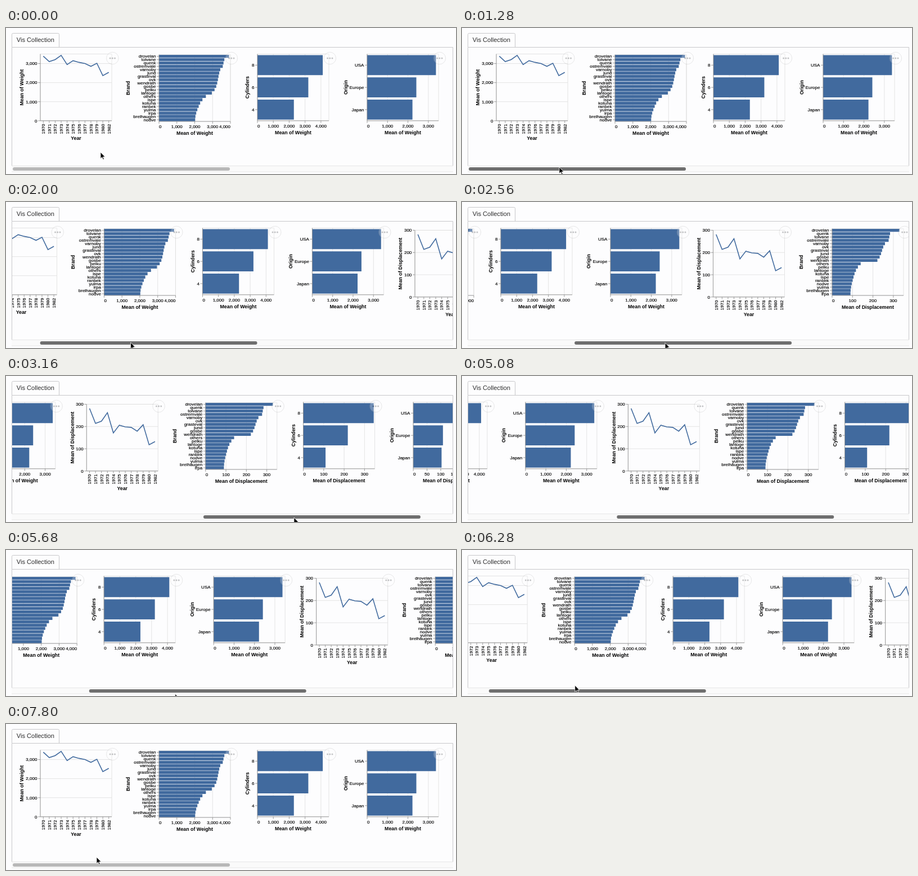
These frames come from a looping animation (800 px wide and 261 px high, 7.88 s). An HTML page:

```html
<!DOCTYPE html>
<html lang="en">
<head>
<meta charset="utf-8">
<title>Vis Collection</title>
<style>
html, body { margin: 0; width: 100%; height: 100%; overflow: hidden; background: #fdfdfe; }
svg { display: block; width: 800px; height: 261px; }
text { font: 8px "Liberation Sans", Arial, sans-serif; stroke: #000; stroke-width: .15; }
.title { font-size: 8.8px; font-weight: bold; text-anchor: middle; stroke: none; }
.tab { font-size: 11.1px; fill: #2a2a2a; stroke: none; }
.mid { text-anchor: middle; }
.end { text-anchor: end; }
.grid { fill: none; stroke: #ddd; stroke-width: .8; }
.axis { fill: none; stroke: #888; stroke-width: .8; }
.mark { fill: #416a9e; }
.line { fill: none; stroke: #416a9e; stroke-width: 1.6; }
.frame { fill: none; stroke: #c8c8ca; }
.menu { opacity: .25; }
</style>
</head>
<body>
<svg viewBox="0 0 800 261">
  <clipPath id="view"><rect x="10" y="35" width="785" height="211"/></clipPath>
  <path class="frame" d="M10.5 34V11.5q0-2 2-2H92.5q2 0 2 2V34"/>
  <text class="tab" x="18.8" y="25">Vis Collection</text>
  <g clip-path="url(#view)"><g id="charts"></g></g>
  <rect x="10" y="246" width="785" height="11" fill="#fafafa"/>
  <path d="M10 246.5H795M10 257H795" stroke="#e6e6e6"/>
  <path class="frame" d="M10.5 246V34.5H794.5V246"/>
  <rect id="thumb" y="249" width="386" height="6" rx="3"/>
  <path id="cursor" d="M0 0V11.5L2.7 9L4.6 13.3L6.4 12.5L4.5 8.4H8.1Z" stroke="#fff" stroke-width=".8"/>
</svg>
<script>
const $ = id => document.getElementById(id);
const W = 127, H = 119.3, LOOP = 7880;

// Monotone cubic curve through [position, value] keys, held flat beyond both ends.
function curve(...keys) {
  const rise = keys.slice(1).map(([t, v], i) => (v - keys[i][1]) / (t - keys[i][0]));
  const slope = keys.map((_, i) => {
    const a = rise[i - 1], b = rise[i];
    return a * b > 0 ? 2 * a * b / (a + b) : 0;
  });
  return t => {
    const i = keys.findIndex(k => k[0] > t);
    if (i === 0) return keys[0][1];
    if (i < 0) return keys[keys.length - 1][1];
    const [t0, v0] = keys[i - 1], [t1, v1] = keys[i], d = t1 - t0, u = (t - t0) / d, w = 1 - u;
    return v0 * (1 + 2 * u) * w * w + v1 * u * u * (3 - 2 * u)
      + d * u * w * (slope[i - 1] * w - slope[i] * u);
  };
}

const path = (cls, d) => `<path class="${cls}" d="${d}"/>`;
const text = (cls, x, y, s, turn) => turn
  ? `<text class="${cls}" transform="translate(${x} ${y}) rotate(-90)">${s}</text>`
  : `<text class="${cls}" x="${x}" y="${y}">${s}</text>`;
const range = n => [...Array(n).keys()];
const ticks = (max, step) => range(Math.floor(max / step) + 1).map(i => i * step);
const num = v => v.toLocaleString('en-US');

function menu(x) {
  const dots = [-4.2, 0, 4.2].map(d => `<circle cx="${x + d}" cy="54" r="1.5" fill="#1b1e23"/>`).join('');
  return `<g class="menu"><circle cx="${x}" cy="54" r="10.8" fill="#fff" stroke="#999" stroke-width=".9"/>${dots}</g>`;
}

function lineChart({ x, top, title, gap, max, step, values }) {
  const base = top + H, px = i => x + (i + .5) * W / values.length, py = v => base - v / max * H;
  let s = path('grid', `M${x} ${top}h${W}v${H}h${-W}z`);
  for (const v of ticks(max, step)) {
    s += path('grid', `M${x} ${py(v)}h${W}`) + path('axis', `M${x} ${py(v)}h-4`)
      + text('end', x - 5.6, py(v) + 2.8, num(v));
  }
  s += path('line', 'M' + values.map((v, i) => `${px(i)} ${py(v)}`).join('L'));
  s += path('axis', `M${x} ${top}v${H}h${W}`);
  values.forEach((_, i) => {
    const year = i < 11 ? 1970 + i : 1982; // 1981 has no data
    s += path('axis', `M${px(i)} ${base}v4`) + text('end', px(i) + 2.9, base + 5.8, year, true);
  });
  return s + text('title', x + W / 2, base + 33.7, 'Year')
    + text('title', x - gap + 3, top + H / 2, title, true) + menu(x + 128.3);
}

function barChart({ x, top = 46.5, field, title, gap, max, step, names, value }) {
  const base = top + H, band = H / names.length, px = v => x + v / max * W;
  let s = path('grid', `M${x} ${top}h${W}v${H}h${-W}z`);
  for (const v of ticks(max, step)) {
    const cls = v === 0 ? '' : v === max ? 'end' : 'mid';
    s += path('grid', `M${px(v)} ${top}v${H}`) + path('axis', `M${px(v)} ${base}v4`)
      + text(cls, px(v), base + 12.4, num(v));
  }
  names.forEach((name, i) => {
    const y = top + (i + .5) * band;
    s += path('mark', `M${x} ${y - band * .45}H${px(value(i))}v${band * .9}H${x}z`)
      + path('axis', `M${x} ${y}h-4`) + text('end', x - 5.6, y + 2.8, name);
  });
  return s + path('axis', `M${x} ${top}v${H}h${W}`)
    + text('title', x + W / 2, base + 24.4, title)
    + text('title', x - gap + 3, top + H / 2, field, true) + menu(x + 128.8);
}

const yearly = [281, 214, 224, 262, 171, 206, 198, 196, 179, 208, 118, 132];
const toWeight = (d, i) => 3050 + 1174 * Math.log(d / 200) + 80 * Math.sin((i - 1.5) * Math.PI / 5);

const weight = { title: 'Mean of Weight', step: 1000 };
const displacement = { title: 'Mean of Displacement', step: 100, max: 350 };
const brand = { field: 'Brand', gap: 55, top: 47.7 };
const cylinders = { field: 'Cylinders', gap: 17.7, names: [8, 6, 4] };
const origin = { field: 'Origin', gap: 38.5, names: ['USA', 'Europe', 'Japan'] };
const words = s => s.split(' ');

$('charts').innerHTML = [
  lineChart({ ...weight, x: 61, top: 46.5, gap: 33, max: 3500, values: yearly.map(toWeight) }),
  barChart({ ...brand, ...weight, x: 272, max: 4000,
    names: words('drovelan tolvane quenk ostremvale varnoby jund grasteval ovk wendrath gosbe pelku lantoge others ispe kotuna ranbek yulma irpa brelhaugen nodve'),
    value: curve([0, 3920], [1, 3660], [3, 3570], [4, 3430], [9, 3205], [11, 2960], [12, 2625], [14, 2305], [19, 2025]) }),
  barChart({ ...cylinders, ...weight, x: 447, max: 4500, value: i => 4115 - 910 * i }),
  barChart({ ...origin, ...weight, x: 642, max: 3500, value: curve([0, 3372], [1, 2411], [2, 2221]) }),
  lineChart({ ...displacement, x: 824.5, top: 50.5, gap: 25.5, max: 300, values: yearly }),
  barChart({ ...brand, ...displacement, x: 1036,
    names: words('drovelan quenk tolvane ostremvale varnoby ovk grasteval jund gosbe wendrath others pelku lantoge kotuna ispe ranbek nodve yulma brelhaugen irpa'),
    value: curve([0, 330], [1, 284], [3, 277], [4, 259], [9, 222], [10, 140], [14, 105], [19, 90]) }),
  barChart({ ...cylinders, ...displacement, x: 1209.8, value: i => 345 - 118 * i - 9 * (i % 2) }),
  barChart({ ...origin, ...displacement, x: 1405.3, max: 260, step: 50, value: curve([0, 247], [1, 108], [2, 103]) })
].join('');

// Drag the scrollbar right, rest at the end, drag it back.
const scroll = curve([1440, 0], [2000, 97.3], [3160, 681], [3820, 792.4], [4200, 792.4], [5080, 529.5], [6280, 72], [7040, 0]);
const grip = curve([920, 156], [1320, 161], [3160, 161], [4240, 153], [6700, 153], [7240, 149]);
const cursorY = curve([920, 222], [1320, 249.5], [3160, 253], [3270, 264], [5300, 264], [6280, 242], [7240, 238]);

function draw(now) {
  const t = now % LOOP, s = scroll(t), left = 12 + s * .4975;
  $('charts').setAttribute('transform', `translate(${-s} 0)`);
  $('thumb').setAttribute('x', left);
  $('thumb').setAttribute('fill', t > 1240 && t < 7200 ? '#6f6f6f' : '#b8b8b8');
  $('cursor').setAttribute('transform', `translate(${left + grip(t)} ${cursorY(t)})`);
  requestAnimationFrame(draw);
}
draw(performance.now());
</script>
</body>
</html>
```
